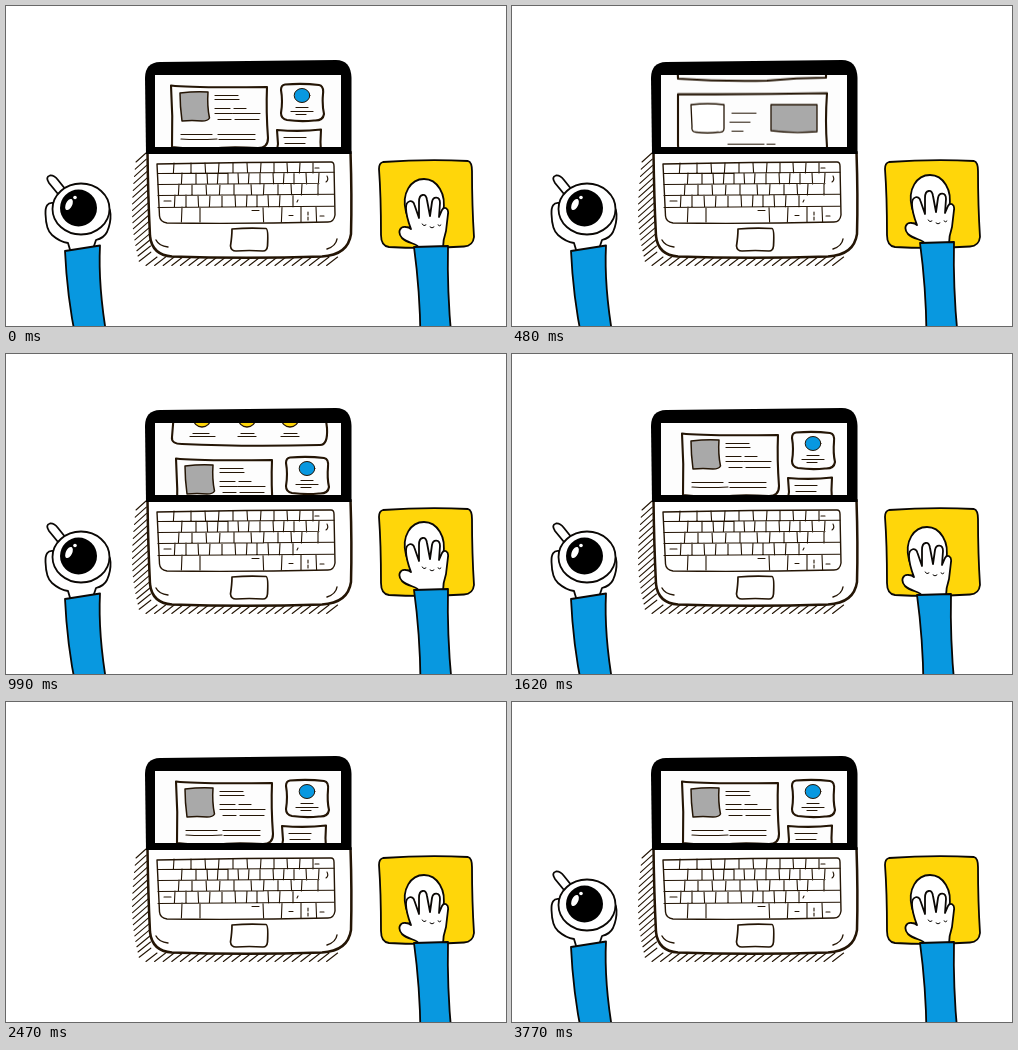
An HTML page for the animation above (4.77 s loop, 500 px wide and 320 px high).

```html
<!DOCTYPE html>
<html lang="en">
<head>
<meta charset="utf-8">
<title>Desk with laptop</title>
<style>
html, body { margin: 0; width: 100%; height: 100%; overflow: hidden; background: #fff; }
svg { display: block; }
.stage { width: 500px; height: 320px; }
.ink { fill: none; stroke: #241505; stroke-linecap: round; stroke-linejoin: round; }
.card { fill: #fdfdfd; stroke-width: 2.1; }
.thin { stroke-width: 1.2; }
.outline { stroke: #0a0704; stroke-width: 1.8; stroke-linejoin: round; stroke-linecap: round; }
.white { fill: #fff; }
.blue { fill: #0898e0; }
.yellow { fill: #ffd60a; }
.grey { fill: #a9a9a9; }

#scroll, #mouse, #coffee { animation: 4770ms linear infinite; }
#scroll { animation-name: scroll; }
#mouse { animation-name: mouse; }
#coffee { animation-name: coffee; }

/* speeds up for 180 ms, then scrolls evenly until 1080 ms */
@keyframes scroll {
  0% { transform: translateY(0); animation-timing-function: steps(3); }
  1.8868% { transform: translateY(-6px); animation-timing-function: steps(3); }
  3.7736% { transform: translateY(-26px); animation-timing-function: steps(30); }
  22.6415%, 100% { transform: translateY(-276px); }
}
@keyframes mouse {
  0% { transform: translate(0, 0); animation-timing-function: steps(3); }
  6.2893% { transform: translate(0, -3px); animation-timing-function: steps(2, start); }
  20.7547%, 28.9308% { transform: translate(0, -5px); animation-timing-function: steps(8); }
  33.9623% { transform: translate(-3px, 0); animation-timing-function: steps(6); }
  37.7358%, 100% { transform: translate(0, 0); }
}
@keyframes coffee {
  0%, 45.4927% { transform: translateY(0); animation-timing-function: steps(10); }
  51.7820%, 72.7463% { transform: translateY(160px); animation-timing-function: steps(10); }
  79.0356%, 100% { transform: translateY(0); }
}
</style>
</head>
<body>
<svg class="stage" viewBox="0 0 500 320">
  <defs>
    <clipPath id="screen"><path d="M149 69H335V141H149Z"/></clipPath>
    <g id="page" class="ink">
      <!-- article, profile and note -->
      <path class="card" d="M165 79.5Q185 82 261 81Q260 105 262 132Q262 142 252 142Q220 140 205 143Q180 143 166 141Q167 110 165 79.5Z"/>
      <path class="grey" stroke-width="1.5" d="M174 87Q190 85 202 86Q201 100 203.5 112Q202 115 196 115Q186 114 176 115Q174 100 174 87Z"/>
      <path class="thin" d="M209 89.5h23M209 93.5h24M209 102.5h15M228 102.5h12M209 107.5h17M227 107.5h27M212 113.5h13M229 113.5h24M175 128.5h31M212 128.5h37M175 133q16 1 36 0M213 133.5h36"/>
      <path class="card" d="M279 78.5Q297 77 313 79Q318 80 317 88Q316 99 318 108Q317 115 308 114.5Q295 116 281 114Q275 113 275 107Q277 95 275 84Q275 79 279 78.5Z"/>
      <ellipse class="blue" cx="296" cy="89.5" rx="7.8" ry="7" stroke-width="1"/>
      <path class="thin" d="M290 101.5h12M285 105.5h22M290 108.5h10"/>
      <path class="card" d="M271 124Q295 126 315 123.5Q314 136 315 147Q298 147 276 145Q270 145 272 138Z"/>
      <path class="thin" d="M278 131.5h22M279 137.5h20M279 142.5h20"/>
      <!-- three columns -->
      <path class="card" d="M165 157Q240 158 314 159V181Q285 181 255 184Q210 185 166 182Z"/>
      <path class="thin" d="M174 165l28 1M175 169.5h16M227 166l15 1M226 170.5h14M272 168l14 -1M273 171.5h12"/>
      <!-- gallery -->
      <path class="card" d="M166 197.5Q240 198 315 196.5Q313 225 315 250Q315 255 308 254.5Q240 257 174 256Q166 256 166 249Z"/>
      <path class="white" stroke-width="1.3" d="M179 208Q196 206 212 208V232Q212 236 206 235.5Q196 237 184 235.5Q179 235 180 230Z"/>
      <path class="grey" stroke-width="1.3" d="M259 208H305V235Q280 237 259 234Z"/>
      <path class="thin" d="M220 216.5h24M218 225.5h20M220 234.5h11M216 247.5h36M255 247.5h8"/>
      <!-- headline and team -->
      <path class="card" d="M167 265Q240 269 318.5 265Q317 300 321 325Q322 342 314 342Q240 344 176 341Q165 341 166 334Q170 295 167 265Z"/>
      <path class="thin" d="M180 277.5h37M180 282q20 -1 35 0M220 282.5h37M180 298.5h37M221 298.5h39M266 298.5h36"/>
      <g class="yellow" stroke-width="1.3">
        <circle cx="196" cy="315" r="9"/><circle cx="241" cy="315" r="9"/><circle cx="284" cy="315" r="9"/>
      </g>
      <path class="thin" d="M187 330.5h16M184 333.5h25M235 330.5h13M232 333.5h18M278 330.5h13M275 333.5h18"/>
    </g>
  </defs>

  <!-- laptop -->
  <path id="hatch" class="ink" stroke-width="1.1"/>
  <path class="ink" style="fill:#fff" stroke-width="2.5" d="M141.5 146Q142 190 144 230Q146 249 166 250.5Q240 253 316 250.5Q342 249 345 228Q346 190 344.5 146Z"/>
  <path d="M140 148Q139.500 110 139 72Q139 56.5 154 56L330 54Q345 54 345.5 72V148Z"/>
  <path fill="#fdfdfd" d="M149 69H335V141H149Z"/>
  <g clip-path="url(#screen)">
    <g id="scroll">
      <use href="#page"/>
      <use href="#page" x="5" y="276"/>
    </g>
  </g>
  <g class="ink">
    <path stroke-width="1.4" d="M151 158Q240 156 325 156Q328 156 328 160L329 209Q328 216 322 216Q240 218 161 217Q154 216 153.5 210Z"/>
    <path id="keys" stroke-width="1.1"/>
    <path stroke-width="1.1" d="M309 162h4M321 170q2 4 -1 6M158 195h7M292 194l-1 2M246 204.5h7M283 209.5h4M302 206v3M302 211v3M314 210h4"/>
    <path stroke-width="1.7" d="M226 223Q243 221.5 260 222.5Q262.500 223 261.5 240Q261 245 257 245Q243 244 230 245Q225 245 224.5 240Q226 230 226 223Z"/>
    <path stroke-width="1.4" d="M150 234Q153 240 162 241M331 233Q330 240 321 243"/>
  </g>

  <!-- mouse mat and right arm -->
  <path class="outline yellow" d="M377 156Q420 153 462 155Q466 156 466 165Q466 200 468 231Q467 240 458 240.5Q420 243 383 241Q375 240 375 229Q375 190 373 163Q373 157 377 156Z"/>
  <g id="mouse" class="outline">
    <path class="white" d="M400 206C395 187 405 173 418 173C431 173 441 188 437 206L432 228H408Z"/>
    <path class="white" d="M413 242C412 237 402 238 396 232C391 226 394 220 400 221Q403 221 405 223Q400 210 400 202C400 194 407 193 408.500 199L413 212L413 196C413 187 420 187 421 194L424 210L426 196C427 190 434 190 434 197L433 211L436 204C438 200 443 202 442 208L440 225Q437 234 437 242"/>
    <path fill="none" stroke-width="1" d="M416 218q2 3 4 1M424 221q2 2 4 0M432 219q2 2 3 0"/>
    <path class="blue" d="M408 241L442 240Q441 285 445.5 332H414.5Q414 285 408 241Z"/>
  </g>

  <!-- left arm with coffee -->
  <g id="coffee" class="outline">
    <path class="white" d="M52 188L43 177Q39 171 44 169.5Q48 169 52 174L60 184Z"/>
    <path class="white" d="M47 197Q39 196 39.5 208Q40 224 46 229Q54 236 62 237L65 247L87 243L90 234Q98 232 101 226Q105 217 104.5 208Q104 200 99 200Z"/>
    <ellipse class="white" cx="75" cy="203" rx="28.5" ry="25.5"/>
    <circle cx="72.5" cy="202" r="18.5" stroke="none" fill="#000"/>
    <g class="white" stroke="none">
      <ellipse cx="63" cy="198.5" rx="3.2" ry="6" transform="rotate(25 63 198.5)"/>
      <circle cx="69" cy="191.5" r="1.8"/>
    </g>
    <path class="blue" d="M59 245L94 239.5Q92 280 101 332L70 334Q61 290 59 245Z"/>
  </g>
</svg>
<script>
const draw = (id, lines) => document.getElementById(id).setAttribute(
  "d", lines.map(([x1, y1, x2, y2]) => `M${x1} ${y1}L${x2} ${y2}`).join(""));

// slanted shading beside and below the laptop
const hatch = [];
for (let i = 0; i < 17; i++) {
  const y = 147 + i * 6.2;
  const bow = Math.sin(i / 16 * Math.PI) * 5;
  hatch.push([130 - bow + i * .2, y + 9 + bow, 140 + i * .3, y]);
}
for (let x = 146; x < 330; x += 8.6) hatch.push([x - 6, 259.5, x + 5, 251]);
draw("hatch", hatch);

// key rows: top, bottom, x of the separators
const rows = [
  [157, 167, [168, 185, 199, 213, 227, 241, 255, 268, 281, 294, 307]],
  [167, 178, [176, 190, 201, 212, 222, 232, 243, 254, 267, 278, 288, 300, 313]],
  [178, 189, [173, 186, 200, 214, 228, 245, 258, 272, 285, 296, 312]],
  [189, 201, [169, 180, 192, 204, 216, 229, 241, 251, 262, 274, 287]],
  [201, 216, [176, 194, 257, 276, 295, 310]]
];
const keys = rows.flatMap(([top, bottom, xs]) =>
  xs.map((x, i) => [x, top, x + (i % 3 - 1) * .6, bottom]));
for (const [top] of rows.slice(1)) keys.push([152, top + .5, top === 178 ? 313 : 328, top - .7]);
draw("keys", keys);
</script>
</body>
</html>
```
